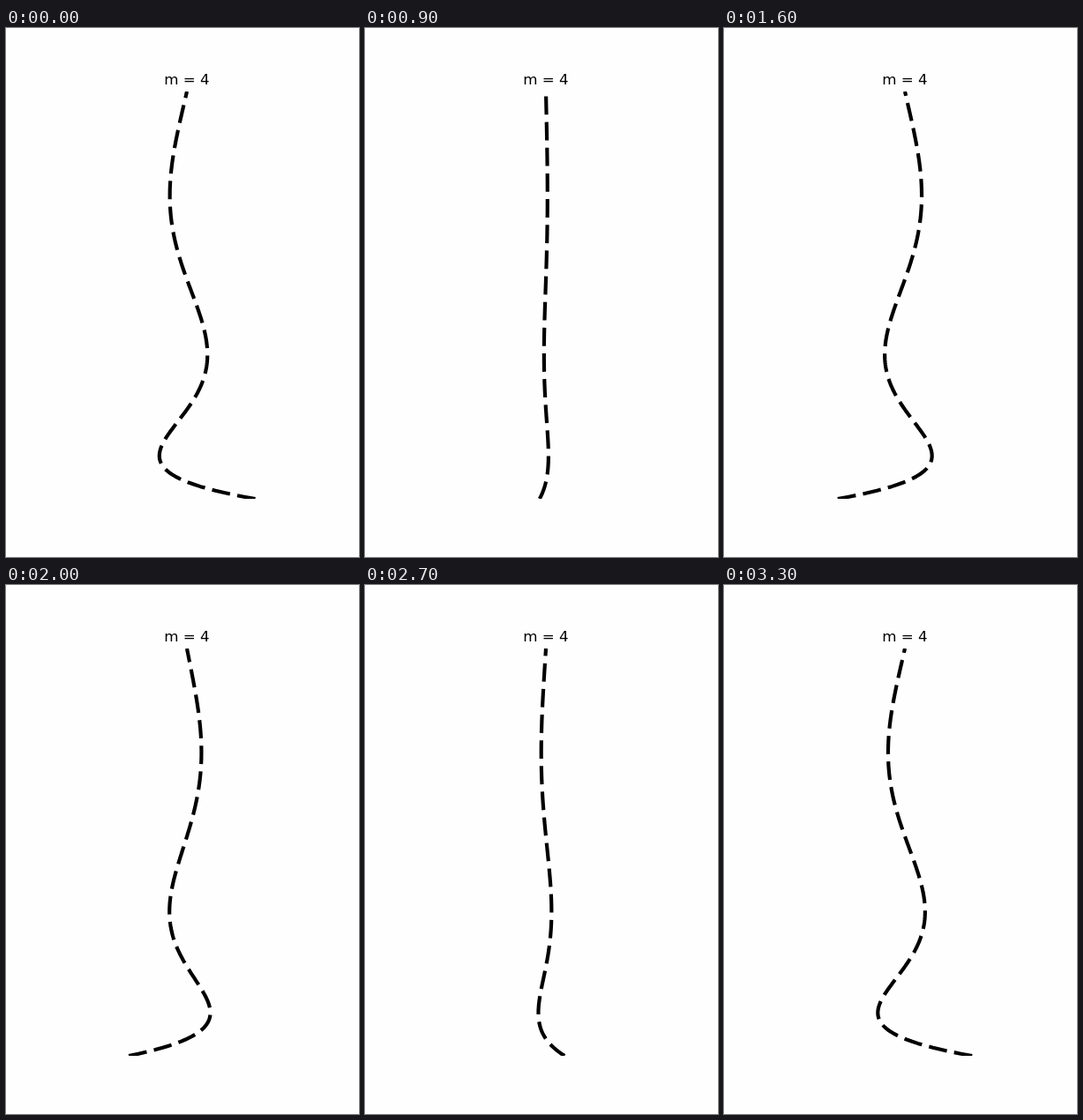
Write an HTML page that moves like this. It is 400 px wide and 600 px high and loops after 3.4 s.

```html
<!DOCTYPE html>
<html lang="en">
<head>
<meta charset="utf-8">
<title>Hanging chain, mode 4</title>
<style>
  html, body { margin: 0; width: 100%; height: 100%; overflow: hidden; background: #fefefe; }
  svg { display: block; }
  text { font: 16.667px "DejaVu Sans", sans-serif; text-anchor: middle; }
  path { fill: none; stroke: #000; stroke-width: 4.167; stroke-dasharray: 20.833 8.333; stroke-linejoin: round; }
</style>
</head>
<body>
<svg width="400" height="600">
  <text x="205" y="64">m = 4</text>
  <!-- the inner svg clips the chain to the plot area -->
  <svg x="50" y="72" width="310" height="462"><path id="chain"/></svg>
</svg>
<script>
const STEP = 100, STEPS = 34;
const LENGTH = 462, CENTRE = 155, AMPLITUDE = 77.5;
const ZERO = 11.791534; // fourth zero of J0
const POINTS = 200;

// Bessel J0 as the mean of cos(z sin a) over half a turn
function j0(z) {
  const n = 24;
  let sum = 0;
  for (let i = 0; i < n; i++) sum += Math.cos(z * Math.sin(Math.PI * (i + 0.5) / n));
  return sum / n;
}

// mode shape, from the free lower end up to the fixed top
const shape = Array.from({ length: POINTS + 1 }, (_, i) => j0(ZERO * Math.sqrt(i / POINTS)));
const chain = document.getElementById("chain");

function draw() {
  const step = Math.floor(performance.now() / STEP) % STEPS;
  const swing = AMPLITUDE * Math.cos(2 * Math.PI * step / STEPS);
  const points = shape.map((v, i) =>
    (CENTRE + swing * v).toFixed(3) + " " + (LENGTH * (1 - i / POINTS)).toFixed(3));
  chain.setAttribute("d", "M" + points.join("L"));
  requestAnimationFrame(draw);
}
draw();
</script>
</body>
</html>
```
